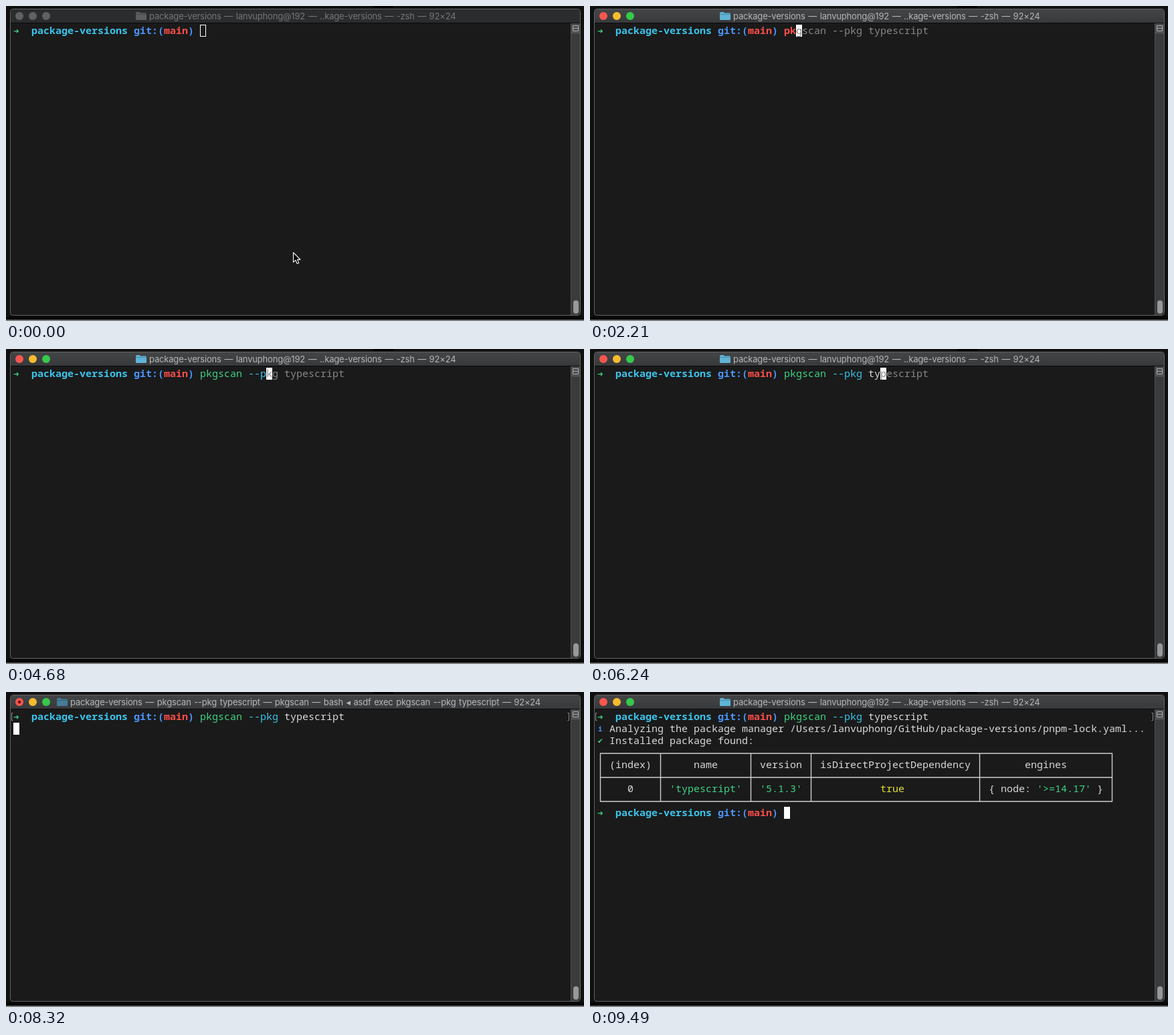
An HTML page that plays this animation: 864x472 px, repeating every 9620 ms.

```html
<!DOCTYPE html>
<html lang="en">
<head>
<meta charset="utf-8">
<title>Terminal</title>
<style>
  html, body { margin: 0; width: 100%; height: 100%; overflow: hidden; background: #101011; }
  #stage { position: absolute; left: 0; top: 0; width: 864px; height: 472px; overflow: hidden; }
  #stage svg { position: absolute; left: 0; top: 0; }
  .title, .cell {
    position: absolute; white-space: pre; font-kerning: none; font-variant-ligatures: none;
  }
  .title {
    top: 5px; font: 13px/21px Inter, "DejaVu Sans", sans-serif;
    letter-spacing: -.18px; word-spacing: 1.1px; color: #757677;
  }
  .active .title { color: #b6b7b8; }
  .cell { font: 15px/18px "Noto Sans Mono", "Liberation Mono", monospace; color: #d9d9d9; }
  .cell.dir, .cell.git, .cell.branch, .cell.bad { font-weight: 700; }
  .cell.dir, .cell.opt { color: #3bc3ea; }
  .cell.git { color: #4c95fb; }
  .cell.branch, .cell.bad { color: #fc4f4b; }
  .cell.ok { color: #3fd384; }
  .cell.hint { color: #878787; }
  .cell.yes { color: #e6e032; }
  .cell.icon { font: 10.5px/18px "DejaVu Sans", sans-serif; color: #3fd384; margin-top: 1px; }
  .cell.info { font-size: 11px; font-weight: 700; color: #4a8ff5; margin: 1px 0 0 1px; }
  #cursor { position: absolute; width: 9px; height: 18px; box-sizing: border-box; border: 1px solid #fff; }
  .active #cursor { background: #fff; }
  .light { fill: #606163; }
  .active .red { fill: #f9564f; }
  .active .amber { fill: #f5bc2f; }
  .active .lime { fill: #36c94b; }
  .bar { fill: #2b2c2e; }
  .active .bar { fill: url(#barFill); }
  #folder { fill: #5c5d5f; }
  .active #folder { fill: #5fb3d5; }
  .busy #folder { fill: #457b95; }
  #dot, #marks { visibility: hidden; }
  .busy #dot, .ran #marks { visibility: visible; }
  #table { visibility: hidden; }
  .done #table { visibility: visible; }
</style>
</head>
<body>
<div id="stage">
  <svg width="864" height="472">
    <defs>
      <linearGradient id="barFill" x1="0" y1="0" x2="0" y2="1">
        <stop offset="0" stop-color="#444547"/><stop offset="1" stop-color="#38393b"/>
      </linearGradient>
    </defs>
    <rect x="549" width="30" height="3" fill="#000"/>
    <rect y="465" width="864" height="5" fill="#080808"/>
    <rect y="470" width="864" height="2" fill="#77787a"/>
    <rect x="6.5" y="4.5" width="852" height="459" rx="4" fill="#1a1a1a" stroke="#626365"/>
    <path class="bar" d="M7 25V9Q7 5 11 5H854Q858 5 858 9V25Z"/>
    <rect x="7" y="25" width="851" height="1" fill="#0a0a0a"/>

    <rect x="844" y="26" width="14" height="437" fill="#3a3b3d"/>
    <rect x="844" y="26" width="1" height="437" fill="#505153"/>
    <rect x="845" y="26" width="13" height="15" fill="#4a4b4d"/>
    <rect x="845" y="40" width="13" height="1" fill="#626365"/>
    <path d="M847.5 29.5H855.5V37.5H847.5ZM848 33.5H855" fill="none" stroke="#b0b1b2"/>
    <rect x="848" y="441" width="8" height="20" rx="4" fill="#97989a"/>

    <circle class="light red" cx="20" cy="15" r="6"/>
    <circle class="light amber" cx="40" cy="15" r="6"/>
    <circle class="light lime" cx="60" cy="15" r="6"/>
    <circle id="dot" cx="20" cy="15" r="2.2" fill="#6c0b09"/>
    <g id="folder">
      <path d="M0 11Q0 9 2 9H5.5L7 10.5H14.5Q16 10.5 16 12V20Q16 21 15 21H1Q0 21 0 20Z"/>
      <path d="M0 12.5H16" stroke="#000" stroke-opacity=".22"/>
    </g>
    <path id="marks" d="M10.5 31.5H8.5V42.5H10.5M839.5 31.5H841.5V42.5H839.5" fill="none" stroke="#8b8b8b"/>
    <path id="table" fill="none" stroke="#cfcfcf" stroke-width="1.4"/>
  </svg>
  <div id="title" class="title"></div>
  <div id="cursor"></div>
  <div id="screen"></div>
  <svg id="mouse" width="864" height="472">
    <path d="M0 0V14.4L3.4 11.3L5.7 16.5L8.2 15.4L6 10.4H10.4Z" transform="translate(429.5 369.5)"
      fill="#000" stroke="#fff" stroke-width="1.1" stroke-linejoin="round"/>
  </svg>
</div>
<script>
const LOOP = 9620, STEP = 130;
const COL = 9, ROW = 18, LEFT = 11, TOP = 27;
const COMMAND = 'pkgscan --pkg typescript', START = 31;
const FOCUS = 1040, ENTER = 8190, OUTPUT = 8580, PROMPT = 9360;

// Time of each keystroke
const KEYS = [
  1820, 2210, 2470, 2730, 2990, 3250, 3510, 3770, 4030, 4290, 4680, 5070,
  5330, 5460, 5720, 5980, 6370, 6630, 6760, 7020, 7280, 7540, 7800, 8060
];

const TITLES = {
  shell: [194, 'package-versions — lanvuphong@192 — ..kage-versions — -zsh — 92×24'],
  run: [76, 'package-versions — pkgscan --pkg typescript — pkgscan — bash ◂ asdf exec pkgscan --pkg typescript — 92×24'],
  tail: [179, 'package-versions — lanvuphong@192 — ..kage-versions — tail ◂ -zsh — 92×24']
};

// Row, column, text, style
const RESULT = [
  [1, 0, 'i', 'info'],
  [1, 2, 'Analyzing the package manager /Users/lanvuphong/GitHub/package-versions/pnpm-lock.yaml...'],
  [2, 0, '✔', 'icon'],
  [2, 2, 'Installed package found:'],
  [4, 2, '(index)'], [4, 16, 'name'], [4, 27, 'version'],
  [4, 37, 'isDirectProjectDependency'], [4, 71, 'engines'],
  [6, 5, '0'], [6, 12, "'typescript'", 'ok'], [6, 27, "'5.1.3'", 'ok'],
  [6, 47, 'true', 'yes'], [6, 65, '{ node:'], [6, 73, "'>=14.17'", 'ok'], [6, 83, '}']
];

const $ = id => document.getElementById(id);
const stage = $('stage'), screen = $('screen'), cursor = $('cursor');

const rules = [92, 128, 164].map(y => `M15 ${y}H781`);
const posts = [0, 10, 25, 35, 63, 85].map(c => `M${LEFT + (c + .5) * COL} 92V164`);
$('table').setAttribute('d', rules.concat(posts).join(''));

function put(row, col, text, style = '') {
  if (!text) return;
  const el = document.createElement('span');
  el.className = 'cell ' + style;
  el.style.left = LEFT + col * COL + 'px';
  el.style.top = TOP + row * ROW + 'px';
  el.textContent = text;
  screen.append(el);
}

function putPrompt(row) {
  put(row, 0, '➜', 'icon');
  put(row, 3, 'package-versions', 'dir');
  put(row, 20, 'git:(', 'git');
  put(row, 25, 'main', 'branch');
  put(row, 29, ')', 'git');
}

function putCommand(count, hint) {
  const typed = COMMAND.slice(0, count);
  put(0, START, typed.slice(0, 7), count < 7 ? 'bad' : 'ok');
  put(0, START + 8, typed.slice(8, 13), 'opt');
  put(0, START + 14, typed.slice(14));
  if (hint) put(0, START + count, COMMAND.slice(count), 'hint');
}

function putCursor(row, col) {
  cursor.style.left = LEFT + col * COL + 'px';
  cursor.style.top = TOP + 1 + row * ROW + 'px';
}

function setTitle([x, text]) {
  $('folder').setAttribute('transform', `translate(${x})`);
  $('title').style.left = x + 20 + 'px';
  $('title').textContent = text;
}

function draw(t) {
  const count = KEYS.filter(k => k <= t).length;
  const ran = t >= ENTER, done = t >= OUTPUT, back = t >= PROMPT;
  const flags = { active: t >= FOCUS, ran, done, busy: ran && !back };
  for (const name in flags) stage.classList.toggle(name, flags[name]);

  screen.replaceChildren();
  putPrompt(0);
  putCommand(count, count > 0 && !ran);
  if (done) RESULT.forEach(item => put(...item));
  if (back) putPrompt(8);

  if (back) putCursor(8, START);
  else if (done) putCursor(8, 0);
  else if (ran) putCursor(1, 0);
  else putCursor(0, START + count);

  setTitle(back || !ran ? TITLES.shell : done ? TITLES.tail : TITLES.run);

  // The pointer drifts up before the click and hides on the first key
  const lift = Math.min(1, Math.max(0, (t - 780) / (FOCUS - 780)));
  $('mouse').style.transform = `translateY(${Math.round(-6 * lift)}px)`;
  $('mouse').style.visibility = t < KEYS[0] ? 'visible' : 'hidden';
}

const begin = performance.now();
let last = -1;
function tick() {
  const step = Math.floor(((performance.now() - begin) % LOOP) / STEP);
  if (step !== last) draw((last = step) * STEP);
  requestAnimationFrame(tick);
}
tick();
</script>
</body>
</html>
```
